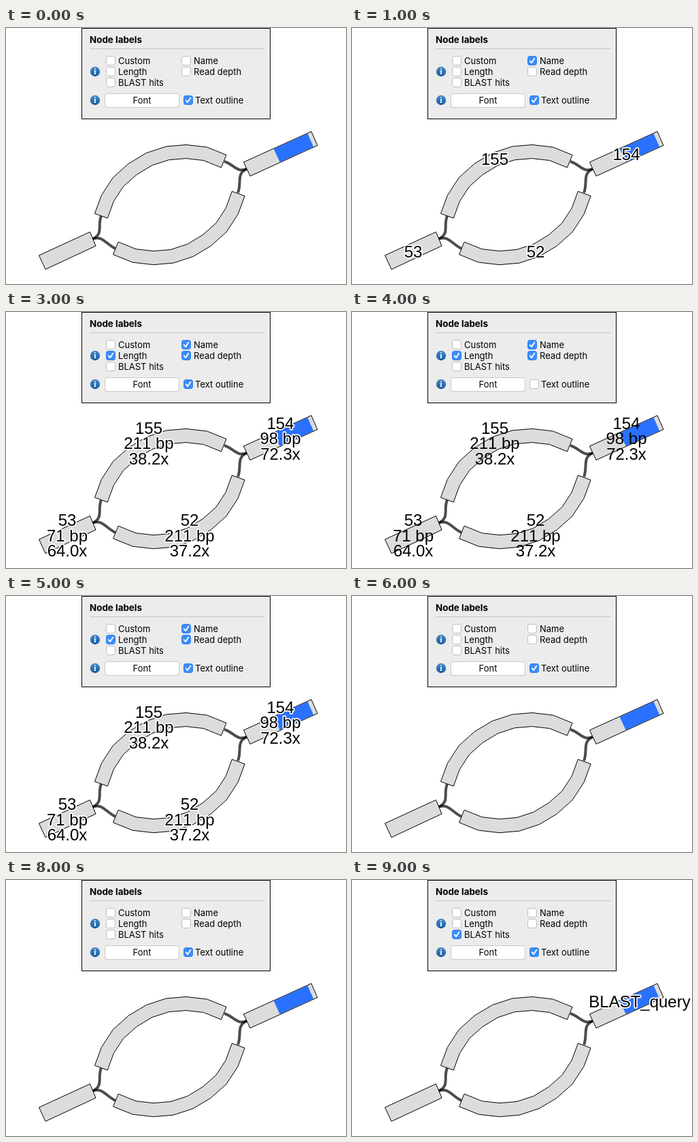
Recreate the animation shown at these times as an HTML page. Size 500 px wide and 376 px high, loop 10 s.

```html
<!DOCTYPE html>
<html lang="en">
<head>
<meta charset="utf-8">
<title>Node labels</title>
<style>
  html, body { margin: 0; width: 100%; height: 100%; overflow: hidden; background: #fff; }
  svg { display: block; width: 100%; height: 100%; }
  .ui { font: 13px Inter, "Open Sans", sans-serif; }
  .ui .title { font-size: 13.4px; font-weight: 700; }
  .info { font: bold 12px "Liberation Serif", serif; fill: #fff; text-anchor: middle; }
  .node { fill: #dcdcdc; stroke: #000; }
  .edge { fill: none; stroke: rgba(0, 0, 0, .7); stroke-width: 4; }
  .box { fill: #fff; stroke: #bcbcbc; }
  .on .box { fill: #3b8df8; stroke: #2f7ff0; }
  .tick { fill: none; stroke: #fff; stroke-width: 1.9; stroke-linecap: round; stroke-linejoin: round; visibility: hidden; }
  .on .tick { visibility: visible; }
  #labels { font: 24px "Liberation Sans", Arial, sans-serif; font-kerning: none; text-anchor: middle; }
  #labels.outlined { paint-order: stroke; stroke: #fff; stroke-width: 3.4px; stroke-linejoin: round; }
</style>
</head>
<body>
<svg viewBox="0 0 500 376">
  <defs>
    <linearGradient id="badge" x2="0" y2="1">
      <stop offset="0" stop-color="#4a8cc8"/>
      <stop offset="1" stop-color="#165a9f"/>
    </linearGradient>
    <path id="arc" class="node" d="M130.500 272.500L140.500 245.500 157.500 219.500 180.500 199 206.500 183.500 235.500 174 265 171.500 295.500 175 324 186.500 316.500 205 290.600 194.500 264.700 191.600 239.500 193.700 214.800 201.700 192.400 215.200 172.700 232.600 158.400 254.500 149.300 279.300Z"/>
    <g id="info">
      <circle r="7.2" fill="url(#badge)"/>
      <text class="info" y="4">i</text>
    </g>
  </defs>

  <g class="ui">
    <rect x="111.500" y=".5" width="277" height="133" fill="#ececec" stroke="#000"/>
    <text class="title" x="123" y="22">Node labels</text>
    <path d="M123 30.500H380" stroke="#c6c6c6"/>
    <use href="#info" x="131" y="64"/>
    <use href="#info" x="131" y="106"/>
    <rect x="145.500" y="97" width="109" height="20" rx="3.500" fill="#bdbdbd"/>
    <rect x="145.500" y="96.500" width="109" height="20" rx="3.500" fill="#fff" stroke="#cacaca"/>
    <text x="200" y="111" text-anchor="middle">Font</text>
    <g id="options"></g>
  </g>

  <path class="edge" d="M321 196C336 201 340 213 354 207"/>
  <path class="edge" d="M341 242C347 228 338 214 354 207"/>
  <path class="edge" d="M127 310C144 303 134 290 140 276"/>
  <path class="edge" d="M127 310C142 304 146 317 161 324"/>
  <use href="#arc"/>
  <use href="#arc" transform="rotate(180 240.800 259.600)"/>
  <path class="node" d="M48.500 334L123.500 299.500 132 320 58 354.500Z"/>
  <path class="node" d="M349.500 197L449 152 458 172.500 359 217.500Z"/>
  <path fill="#2a71ff" d="M393.700 177.600L443.500 155.100 452.200 174.600 402.700 197.100Z"/>
  <g id="labels"></g>
</svg>
<script>
const SVG = "http://www.w3.org/2000/svg";
const LINE = 22.6;
const DIGIT_HEIGHT = 17;
const DESCENT = 4.4;
const STEP = 1000;

const options = [
  { key: "custom", text: "Custom", x: 147, y: 41, gap: 18 },
  { key: "length", text: "Length", x: 147, y: 57, gap: 18 },
  { key: "blast", text: "BLAST hits", x: 147, y: 73, gap: 18 },
  { key: "name", text: "Name", x: 258, y: 41, gap: 18 },
  { key: "depth", text: "Read depth", x: 258, y: 57, gap: 18 },
  { key: "outline", text: "Text outline", x: 261, y: 99, gap: 17 }
];

const nodes = [
  { x: 210, y: 192.7, name: "155", length: "211 bp", depth: "38.2x", custom: "custom label 1" },
  { x: 270, y: 328, name: "52", length: "211 bp", depth: "37.2x", custom: "custom label 2" },
  { x: 90, y: 328, name: "53", length: "71 bp", depth: "64.0x" },
  { x: 403.5, y: 185.7, name: "154", length: "98 bp", depth: "72.3x" },
  { x: 423, y: 176.3, blast: "BLAST_query" }
];

// Checked options for each second of the loop
const states = [
  "outline",
  "name outline",
  "name length outline",
  "name length depth outline",
  "name length depth",
  "name length depth outline",
  "outline",
  "custom outline",
  "outline",
  "blast outline"
].map(s => s.split(" "));

function add(parent, tag, attrs, text = "") {
  const el = document.createElementNS(SVG, tag);
  for (const key in attrs) el.setAttribute(key, attrs[key]);
  el.textContent = text;
  return parent.appendChild(el);
}

const optionLayer = document.getElementById("options");
const labelLayer = document.getElementById("labels");

for (const o of options) {
  o.el = add(optionLayer, "g", { transform: `translate(${o.x} ${o.y})` });
  add(o.el, "rect", { class: "box", x: .5, y: .5, width: 13, height: 13, rx: 3 });
  add(o.el, "path", { class: "tick", d: "M3.800 7.300L6.200 10 10.300 3.800" });
  add(o.el, "text", { x: o.gap, y: 12 }, o.text);
}

// The last baseline sits half the block's inked height below the node centre.
function drawLabel(node, lines) {
  const last = lines.length - 1;
  const descent = /[pqy]/.test(lines[last]) ? DESCENT : 0;
  const baseline = node.y + (DIGIT_HEIGHT + last * LINE + descent) / 2;
  lines.forEach((line, i) => {
    add(labelLayer, "text", { x: node.x, y: baseline - (last - i) * LINE }, line);
  });
}

function show(checked) {
  for (const o of options) o.el.classList.toggle("on", checked.includes(o.key));
  labelLayer.classList.toggle("outlined", checked.includes("outline"));
  labelLayer.replaceChildren();
  for (const node of nodes) {
    drawLabel(node, checked.map(key => node[key]).filter(Boolean));
  }
}

let current = -1;
function tick() {
  const index = Math.floor(performance.now() / STEP) % states.length;
  if (index !== current) show(states[current = index]);
  requestAnimationFrame(tick);
}
tick();
</script>
</body>
</html>
```
